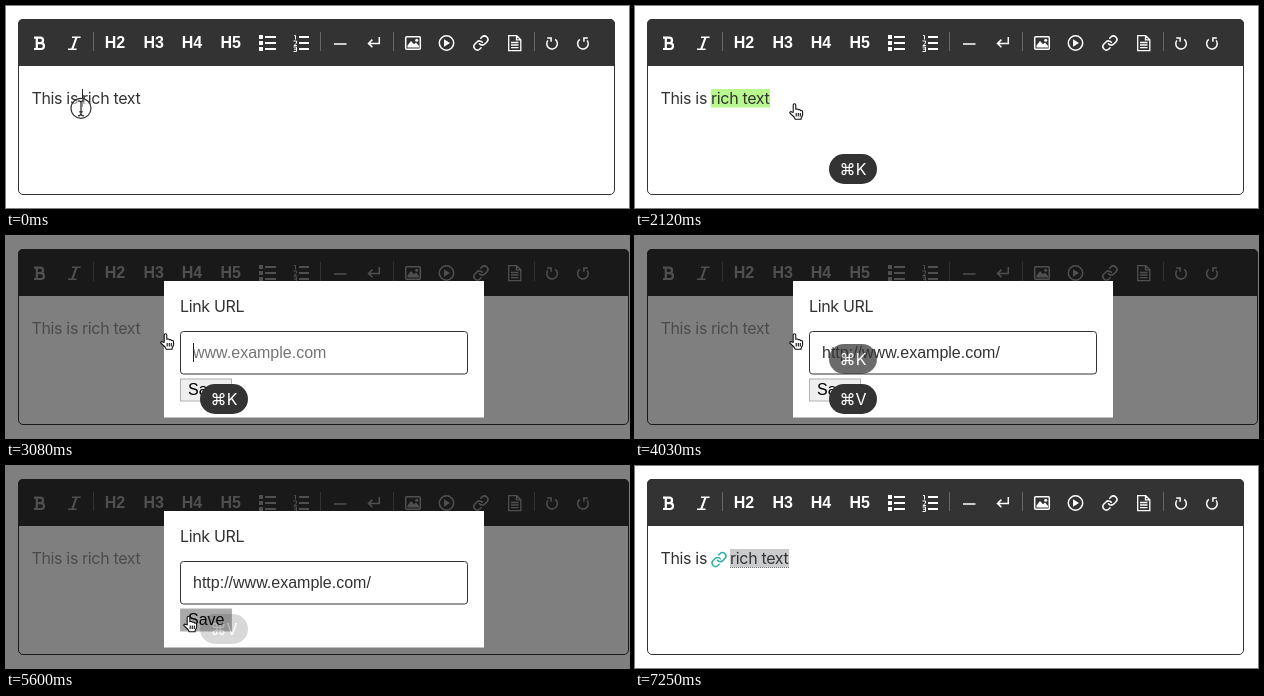
An HTML page for the animation above (7.35 s loop, 623 by 202 pixels).

```html
<!DOCTYPE html>
<html lang="en">
<head>
<meta charset="utf-8">
<title>Rich text editor: adding a link</title>
<style>
  html, body { margin: 0; width: 100%; height: 100%; overflow: hidden; background: #fff; }
  svg { display: block; width: 623px; height: 202px; }
  text { font: 16px "Liberation Sans", Arial, sans-serif; fill: #333; }
  .body { font-family: Inter, Roboto, sans-serif; letter-spacing: -.35px; white-space: pre; }
  .head text { font-weight: bold; fill: #fff; text-anchor: middle; }
  .line { fill: none; stroke: #fff; stroke-width: 1.5; }
  .pill rect { fill: #333; }
  .pill text { font-family: Inter, "DejaVu Sans", sans-serif; fill: #fff; text-anchor: middle; }
</style>
</head>
<body>
<svg viewBox="0 0 623 202">
  <defs>
    <path id="chain" fill="none" stroke-width="2.2" stroke-linecap="round"
      d="M10 13a5 5 0 0 0 7.54.54l3-3a5 5 0 0 0-7.07-7.07l-1.72 1.71M14 11a5 5 0 0 0-7.54-.54l-3 3a5 5 0 0 0 7.07 7.07l1.71-1.71"/>
    <path id="turn" class="line" d="M549.2 33.4A5.3 5.3 0 1 1 541.9 34.4M541.2 31.9h3.9v3.9"/>
  </defs>

  <rect id="frame" x="12.5" y="13.5" width="596" height="175" rx="4.5" fill="#fff" stroke="#333"/>
  <path id="bar" fill="#333"/>
  <path stroke="#666" d="M87.5 26v19M314.5 26v19M387.5 26v19M528.5 26v19"/>

  <g id="tools" class="head">
    <path class="line" stroke-width="2" style="stroke-width:2.2"
      d="M28 31.6h6.3a2.7 2.7 0 0 1 0 5.5h-3.8M28 43h7a2.9 2.9 0 0 0 0-5.9h-4.5M30.8 31v12"/>
    <path class="line" d="M66 31.2h8.6M62 43.2h8.6"/>
    <path class="line" style="stroke-width:2" d="M70.6 31.2l-4.4 12"/>
    <text x="109" y="42">H2</text>
    <text x="147.7" y="42">H3</text>
    <text x="186" y="42">H4</text>
    <text x="224.7" y="42">H5</text>
    <path fill="#fff" d="M253 29h4v4h-4zM253 35h4v4h-4zM253 41h4v4h-4z"/>
    <path class="line" style="stroke-width:2" d="M259 31h11M259 37h11M259 43h11M293 31h10M293 37h10M293 43h10"/>
    <path class="line" style="stroke-width:1"
      d="M288 29.5h1.5v4M287.5 35h3v2l-2.5 2.5h3M287.5 41h3v4.5h-3M288 43.2h2.5"/>
    <path class="line" d="M328 38h12.5"/>
    <path class="line" d="M373.3 31v6.4h-10.5M366.4 33.6l-3.9 3.8 3.9 3.8"/>
    <rect class="line" x="399.7" y="30.7" width="14.6" height="12.6" rx="1"/>
    <path fill="#fff" d="M401.5 41.5v-2l3.5-4.5 3 3.2 2-1.6 3 3.4v1.5z"/>
    <circle cx="410.7" cy="34.2" r="1.5" fill="#fff"/>
    <circle class="line" cx="440.5" cy="37" r="7.2"/>
    <path fill="#fff" d="M438 33.3v7.4l6-3.7z"/>
    <use href="#chain" stroke="#fff" transform="translate(466.5 28.6) scale(.7)"/>
    <path class="line" style="stroke-width:1.3" d="M502.7 29.7h8l4.1 4v10.9h-12.1zM510.5 29.7v4.2h4.3M505 36.5h7.5M505 39h7.5M505 41.6h7.5"/>
    <use href="#turn"/>
    <use href="#turn" transform="translate(1123 0) scale(-1 1)"/>
  </g>

  <g id="content">
    <rect id="mark" y="83" height="18.5"/>
    <text class="body" x="25.5" y="98">This is</text>
    <use id="linkIcon" href="#chain" stroke="#2fb0a6" transform="translate(75.7 85.3) scale(.69)"/>
    <path id="dots" d="M95 101.5h59" stroke="#777" stroke-dasharray="1 1"/>
    <text id="rich" class="body" y="98">rich text</text>
  </g>
  <path id="caret" d="M76.5 83v18" stroke="#222"/>

  <rect id="shade" width="623" height="202" opacity=".5"/>
  <g id="modal">
    <rect x="158" y="45" width="320" height="136.5" fill="#fff"/>
    <text class="body" x="174" y="76">Link URL</text>
    <rect x="174.5" y="95.5" width="287" height="42.5" rx="3" fill="#fff" stroke="#333"/>
    <text id="url" x="187" y="122"></text>
    <path id="fieldCaret" stroke="#222"/>
    <rect id="save" x="174.5" y="143" width="51" height="22" stroke="#b0b0b0"/>
    <text x="182" y="158.7" style="fill:#000">Save</text>
  </g>

  <g id="pillK" class="pill">
    <rect x="194" width="48" height="30" rx="15"/><text x="218" y="21">⌘K</text>
  </g>
  <g id="pillV" class="pill">
    <rect x="194" width="48" height="30" rx="15"/><text x="218" y="21">⌘V</text>
  </g>

  <g id="beam">
    <circle id="press" r="10" fill="#fff" fill-opacity=".55" stroke="#333" stroke-width="1.2"/>
    <path fill="none" stroke="#222" stroke-width="1.2" d="M-3 -7.5q3 0 3 2.2v10.6q0 2.2-3 2.2M3 -7.5q-3 0-3 2.2M3 7.5q-3 0-3-2.2M-1.8 3.5h3.6"/>
  </g>
  <path id="hand" fill="#fff" stroke="#111" stroke-width="1.1" stroke-linejoin="round"
    d="M4.2 9.4V2a1.3 1.3 0 0 1 2.6 0v4.2q2.2-.7 2.5.6 2-.5 2.3.8 2-.4 2 1.4v3l-1.5 3.2v1H6.2L5 14 .7 9.8q.5-1.8 2.2-.8zM7.2 10v3.6M9.3 10v3.6M11.3 10v3.6"/>
</svg>
<script>
const LOOP = 7350;
const OPEN = 2180, CLOSE = 5650, PASTE = 3560;
const EDGES = [0, 5.5, 9, 17.7, 26.8, 31, 36.5, 45.5, 54, 59]; // letter edges of "rich text"
const $ = id => document.getElementById(id);
const set = (id, attrs) => { for (const k in attrs) $(id).setAttribute(k, attrs[k]); };
const show = (id, on) => set(id, { visibility: on ? 'inherit' : 'hidden' });
const within = (t, a, b) => t >= a && t < b;
const clamp = v => Math.max(0, Math.min(1, v));
const ease = p => p * p * (3 - 2 * p);

// [start, end, number of steps, target x, target y]
const BEAM = [
  [60, 280, 4, 75.5, 95.5],
  [760, 1110, 7, 159.5, 95.5],
  [5650, 5650, 1, 182.5, 150],
  [6250, 6360, 3, 305, 228]
];
const HAND = [
  [4085, 4720, 12, 176, 147],
  [4780, 5010, 4, 177, 149.5]
];

function place(t, x, y, moves) {
  for (const [a, b, n, tx, ty] of moves) {
    if (t < a) break;
    const k = n < 2 ? 1 : Math.min(n, Math.floor((t - a) / (b - a) * (n - 1) + .001) + 1);
    const p = ease(k / n);
    x += (tx - x) * p;
    y += (ty - y) * p;
  }
  return [x, y];
}

function pill(id, t, start, y) {
  show(id, t >= start);
  set(id, {
    transform: `translate(0 ${y})`,
    opacity: clamp((2.065 - (t - start) / 1000) / .13)
  });
}

function draw(t) {
  const open = within(t, OPEN, CLOSE), linked = t >= CLOSE, dim = within(t, OPEN, 5710);
  const right = open ? 623 : 609;
  const [bx, by] = place(t, 75, 102.3, BEAM);
  const [hx, hy] = place(t, 154, 97, HAND);

  // the page widens while its scrollbar is hidden
  set('frame', { width: right - 13 });
  set('bar', { d: `M12 60V18a5 5 0 0 1 5-5H${right - 5}a5 5 0 0 1 5 5V60z` });
  set('tools', { opacity: dim ? .53 : 1 });
  set('content', { opacity: dim ? .5 : 1 });

  const left = linked ? 95 : 76;
  const reach = linked ? 59 : Math.max(...EDGES.filter(e => e <= Math.max(0, bx - 75)));
  set('rich', { x: left });
  set('mark', { x: left, width: reach, fill: t < 7250 ? '#b9f78f' : '#c9cbcd' });
  show('mark', within(t, 760, OPEN) || linked);
  show('linkIcon', linked);
  show('dots', linked);
  show('caret', t < 180);

  show('shade', open);
  show('modal', open);
  set('modal', { opacity: t < 2300 ? .95 : 1 });
  const pasted = t >= PASTE, cx = pasted ? 365.5 : 187.5;
  $('url').textContent = pasted ? 'http://www.example.com/' : 'www.example.com';
  $('url').style.fill = pasted ? '#333' : '#757575';
  set('fieldCaret', { d: `M${cx} 107v19` });
  show('fieldCaret', within(t, OPEN, 2600) || within(t, 3080, 4030) || within(t, 4510, 4990));
  set('save', { fill: t >= 5490 ? '#a9a9a9' : '#efefef' });

  pill('pillK', t, 2060, pasted ? 108 : 148);
  pill('pillV', t, PASTE, 148);

  set('beam', { transform: `translate(${bx} ${by})` });
  show('beam', t < 2120 || within(t, CLOSE, 6360));
  show('press', t < 60 || within(t, 580, 1410));
  set('hand', { transform: `translate(${hx} ${hy})` });
  show('hand', within(t, 2120, CLOSE));
}

const begin = performance.now();
function tick() {
  draw((performance.now() - begin) % LOOP);
  requestAnimationFrame(tick);
}
tick();
</script>
</body>
</html>
```
